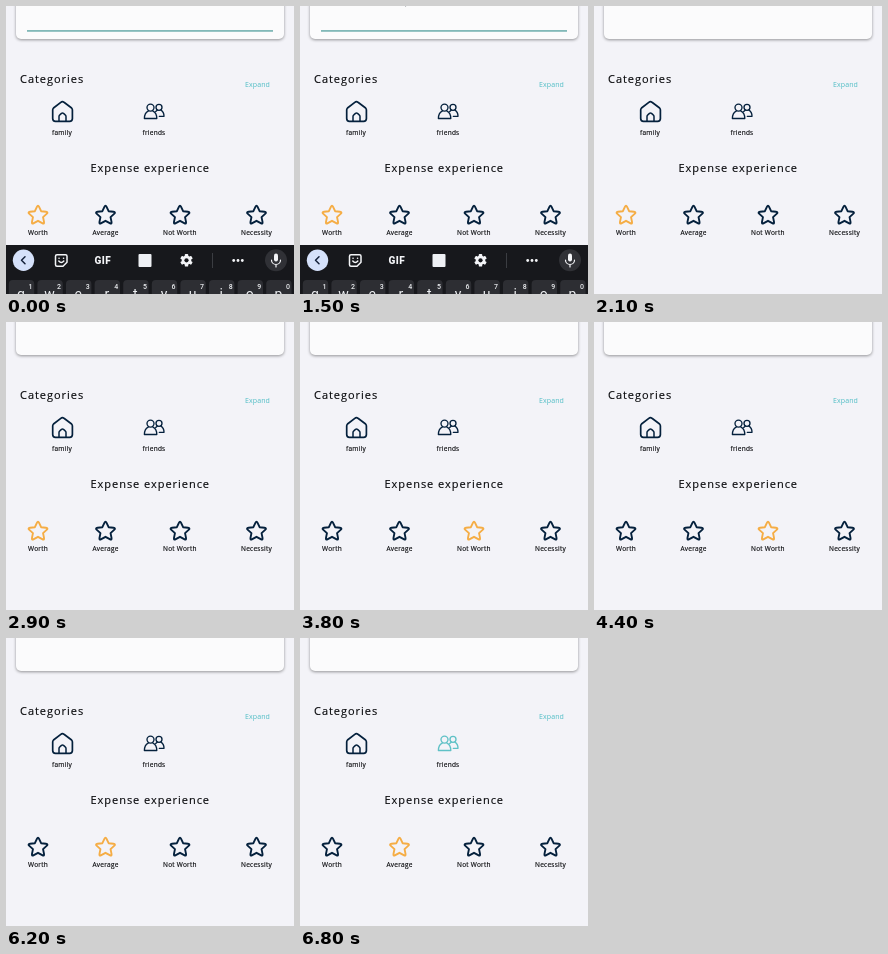
An HTML page that plays this animation: 288x288 px, repeating every 7100 ms.

```html
<!DOCTYPE html>
<html lang="en">
<head>
<meta charset="utf-8">
<title>Expense form</title>
<style>
  html, body { margin: 0; width: 100%; height: 100%; overflow: hidden; background: #f3f3f8; }
  svg { display: block; width: 100%; height: 100%; }
  text { font-family: "Open Sans", "Noto Sans", sans-serif; fill: #08090c; }
  .heading { font-size: 11px; letter-spacing: .97px; stroke: #08090c; stroke-width: .15; }
  .label { font-size: 6.5px; letter-spacing: .25px; stroke: #08090c; stroke-width: .15; }
  .link { font-size: 7px; letter-spacing: .1px; fill: #4dbcc4; }
  .icon { fill: none; stroke: #04203c; stroke-width: 1.7; stroke-linecap: round; stroke-linejoin: round; }
  .tool { fill: none; stroke: #f4f5f8; stroke-width: 1.5; stroke-linecap: round; stroke-linejoin: round; }
  .key { font: 14px Roboto, sans-serif; fill: #eceef1; text-anchor: middle; }
  .digit { font: 500 7px Roboto, sans-serif; fill: #eceef1; text-anchor: middle; }
  .card { filter: drop-shadow(0 1px 1.5px #0006); }
</style>
</head>
<body>
<svg viewBox="0 0 288 288">
  <rect width="288" height="288" fill="#f3f3f8"/>
  <rect class="card" x="10" y="-20" width="268" height="53" rx="5" fill="#fbfbfc"/>
  <rect id="underline" x="21" y="24" width="246" height="1.8"/>
  <path id="descender" d="M104.5 -.6q1.2 1.4 2.8 -.4" fill="none" stroke="#666a72"/>

  <text class="heading" x="14" y="77">Categories</text>
  <text class="link" x="239" y="81">Expand</text>
  <g class="icon">
    <path d="M46.7 104Q46.7 102.8 47.5 102L54.8 96.3Q56.4 95 58 96.3L65.6 102Q66.4 102.8 66.4 104V112.5Q66.4 115.3 63.6 115.3H49.5Q46.7 115.3 46.7 112.5Z"/>
    <path d="M53 115V110.4Q53 109.4 53.8 108.8L55.5 107.4Q56.5 106.6 57.5 107.4L59.2 108.8Q60 109.4 60 110.4V115" style="stroke-width:1.5"/>
  </g>
  <g class="icon" id="friends" style="stroke-width:1.35">
    <circle cx="144.5" cy="101.6" r="3.5"/>
    <path d="M142.2 105.2Q138.4 107.2 138.4 112.5H150.8Q150.8 107.2 147 105.2"/>
    <circle cx="153" cy="101.3" r="3"/>
    <path d="M155 104.2Q158 106 158 110.3H153.3M151.2 104.3L149.7 105.6"/>
  </g>
  <text class="label" x="46" y="129">family</text>
  <text class="label" x="136.5" y="129">friends</text>

  <text class="heading" x="84.5" y="166">Expense experience</text>
  <g id="ratings"></g>

  <g id="keyboard">
    <rect y="239" width="288" height="49" fill="#17181c"/>
    <circle cx="17.5" cy="254.3" r="10.7" fill="#d5e1fa"/>
    <path class="tool" d="M19 250.8l-3.5 3.5 3.5 3.5" style="stroke:#14213a"/>
    <g class="tool">
      <path d="M51 248.8H59.5Q61 248.8 61 250.3V256.3L57 260.2H51Q49.5 260.2 49.5 258.7V250.3Q49.5 248.8 51 248.8Z"/>
      <path d="M52.8 255q2.5 3 5 0M53 252.2h.1M57.5 252.2h.1"/>
    </g>
    <text x="88.4" y="257.8" style="font:900 10px Roboto,sans-serif;letter-spacing:.5px;fill:#f4f5f8">GIF</text>
    <rect x="132.5" y="248" width="13" height="13" rx="1" fill="#eef0f4"/>
    <g id="gear" transform="translate(180.5 254.3)" fill="#f4f5f8"></g>
    <rect x="206" y="247" width="1" height="15" fill="#3b3d42"/>
    <g fill="#f4f5f8">
      <circle cx="227.7" cy="254.5" r="1.4"/><circle cx="232" cy="254.5" r="1.4"/><circle cx="236.3" cy="254.5" r="1.4"/>
    </g>
    <circle cx="270" cy="254.3" r="11" fill="#303136"/>
    <rect x="268" y="247.5" width="4" height="8" rx="2" fill="#f4f5f8"/>
    <path class="tool" d="M265.5 254a4.5 4.5 0 0 0 9 0M270 258.7V261" style="stroke-width:1.2"/>
    <g id="keys"></g>
  </g>
</svg>
<script>
const LOOP = 7100;
const NAVY = '#04203c', AMBER = '#f5ad45', TEAL = '#5fc1c6';
const HIDE_KEYBOARD = 1700, TYPE_TEXT = 600, PICK_FRIENDS = 6700;
const picks = [[0, 0], [3700, 2], [6000, 1]]; // [time, rating index]
const ratings = [['Worth', 32, 22], ['Average', 99.5, 86.5], ['Not Worth', 174, 157], ['Necessity', 250.5, 235]];
const byId = id => document.getElementById(id);

// Five-pointed star with softened tips
function starPath(cx, cy, outer, inner) {
  const point = i => {
    const angle = (i / 5 - .5) * Math.PI, r = i % 2 ? inner : outer;
    return [cx + r * Math.cos(angle), cy + r * Math.sin(angle)];
  };
  const mix = (a, b, k) => a.map((v, i) => (v + (b[i] - v) * k).toFixed(2));
  let path = '';
  for (let i = 0; i < 10; i += 2) {
    const tip = point(i), before = point(i + 9), after = point(i + 1);
    path += `${i ? 'L' : 'M'}${mix(tip, before, .35)}Q${tip} ${mix(tip, after, .35)}L${after}`;
  }
  return path + 'Z';
}

byId('ratings').innerHTML = ratings.map(([name, cx, left]) =>
  `<path class="icon star" style="stroke-width:1.9" d="${starPath(cx, 209.5, 11.1, 5.3)}"/>
   <text class="label" x="${left}" y="229">${name}</text>`).join('');

byId('gear').innerHTML = [0, 60, 120].map(a =>
  `<rect x="-1.7" y="-6.3" width="3.4" height="12.6" rx=".7" transform="rotate(${a})"/>`).join('') +
  '<circle r="4.7"/><circle r="2.1" fill="#17181c"/>';

byId('keys').innerHTML = [...'qwertyuiop'].map((letter, i) => {
  const x = 15.5 + 28.6 * i;
  return `<rect x="${x - 12.7}" y="274" width="25.4" height="30" rx="4" fill="#2d2e33"/>
    <text class="key" x="${x - .5}" y="293">${letter}</text>
    <text class="digit" x="${x + 9}" y="282.8">${(i + 1) % 10}</text>`;
}).join('');

const stars = document.querySelectorAll('.star');

function draw(t) {
  const typing = t < HIDE_KEYBOARD;
  byId('keyboard').style.display = typing ? '' : 'none';
  byId('descender').style.display = typing && t >= TYPE_TEXT ? '' : 'none';
  byId('underline').setAttribute('fill', typing ? '#82b9b8' : '#cdd0d5');
  byId('underline').style.opacity = typing ? 1 : Math.max(0, 1 - (t - HIDE_KEYBOARD) / 200);
  const selected = picks.filter(([start]) => t >= start).pop()[1];
  stars.forEach((star, i) => star.style.stroke = i === selected ? AMBER : NAVY);
  byId('friends').style.stroke = t >= PICK_FRIENDS ? TEAL : NAVY;
}

const origin = performance.now();
function tick() {
  draw((performance.now() - origin) % LOOP);
  requestAnimationFrame(tick);
}
tick();
</script>
</body>
</html>
```
